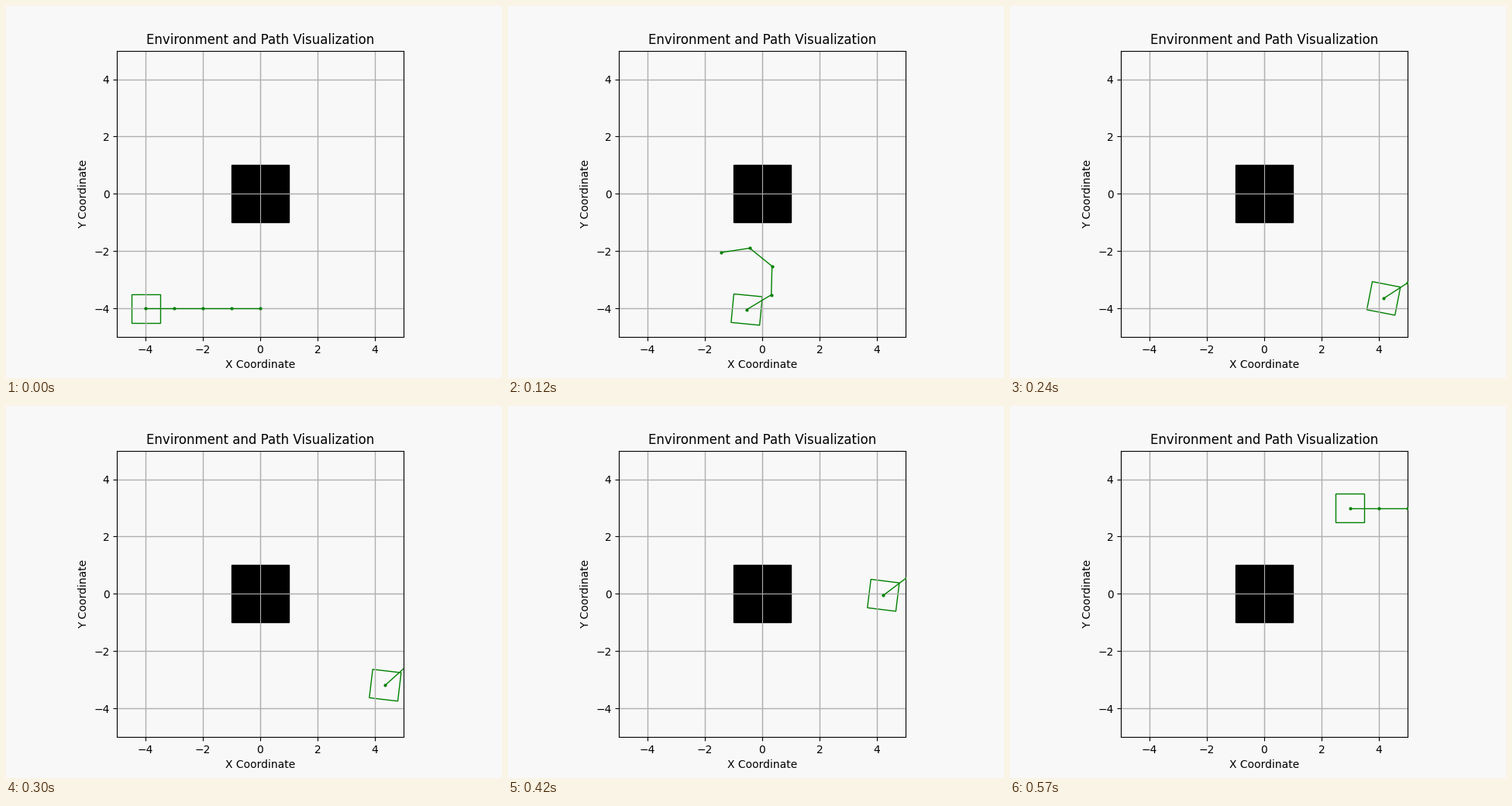
Animation, 640 px wide and 480 px high, one loop 0.6 s. Source, as a matplotlib script:

```python
import numpy as np
import matplotlib.pyplot as plt
from matplotlib.animation import FuncAnimation
from matplotlib.patches import Polygon, Rectangle

FRAMES, INTERVAL = 20, 30
PAPER, GRID, ROBOT = "#f8f8f8", "#b0b0b0", "green"

# Waypoints: step, base x, base y, base heading, arm heading (degrees)
WAYPOINTS = np.array([
    (0, -4.00, -4.00, 0, 0),
    (4, -0.54, -4.04, -5.5, 31),
    (8, 4.17, -3.65, -11, 33),
    (12, 4.56, -2.73, -2.5, 51),
    (14, 4.23, -0.05, -7, 37),
    (17, 4.19, 3.10, -20.5, 8),
    (19, 3.00, 3.00, 0, 0),
]).T
LINK = np.arange(4)
CORNERS = np.pi / 4 + np.pi / 2 * np.arange(4)


def polar(angles):
    return np.column_stack([np.cos(angles), np.sin(angles)])


def curl(step):
    """Bend per joint: winds up steadily, then unrolls with an ease-out."""
    last = FRAMES - 1
    return 60 * min(step / 4, ((last - step) / (last - 4)) ** 3)


def pose(step):
    steps, *tracks = WAYPOINTS
    x, y, turn, lead = [np.interp(step, steps, track) for track in tracks]
    # Joints further out bend a little less
    links = lead + curl(step) * (LINK - LINK ** 2 / 24)
    return np.array([x, y]), np.radians(turn), np.radians(links)


fig, ax = plt.subplots(figsize=(6.4, 4.8), dpi=100, facecolor=PAPER)
ax.set_facecolor(PAPER)
ticks = range(-4, 5, 2)
ax.set(xlim=(-5, 5), ylim=(-5, 5), aspect="equal", xticks=ticks, yticks=ticks,
       xlabel="X Coordinate", ylabel="Y Coordinate",
       title="Environment and Path Visualization")
ax.set_axisbelow(True)
ax.grid(True, color=GRID, lw=1)

# The zero lines stay visible on top of the obstacle
ax.add_patch(Rectangle((-1, -1), 2, 2, color="black"))
ax.axhline(0, color=GRID, lw=0.8)
ax.axvline(0, color=GRID, lw=0.8)

base = ax.add_patch(Polygon(polar(CORNERS), fill=False, ec=ROBOT, lw=1,
                            zorder=0.4))
arm, = ax.plot([], [], "o-", color=ROBOT, lw=1, ms=2, zorder=3)


def update(step):
    center, turn, links = pose(step)
    base.set_xy(center + polar(CORNERS + turn) / np.sqrt(2))
    joints = np.vstack([center, center + polar(links).cumsum(axis=0)])
    arm.set_data(*joints.T)
    return base, arm


anim = FuncAnimation(fig, update, frames=FRAMES, interval=INTERVAL,
                     repeat=True, repeat_delay=0)
plt.show()
```
